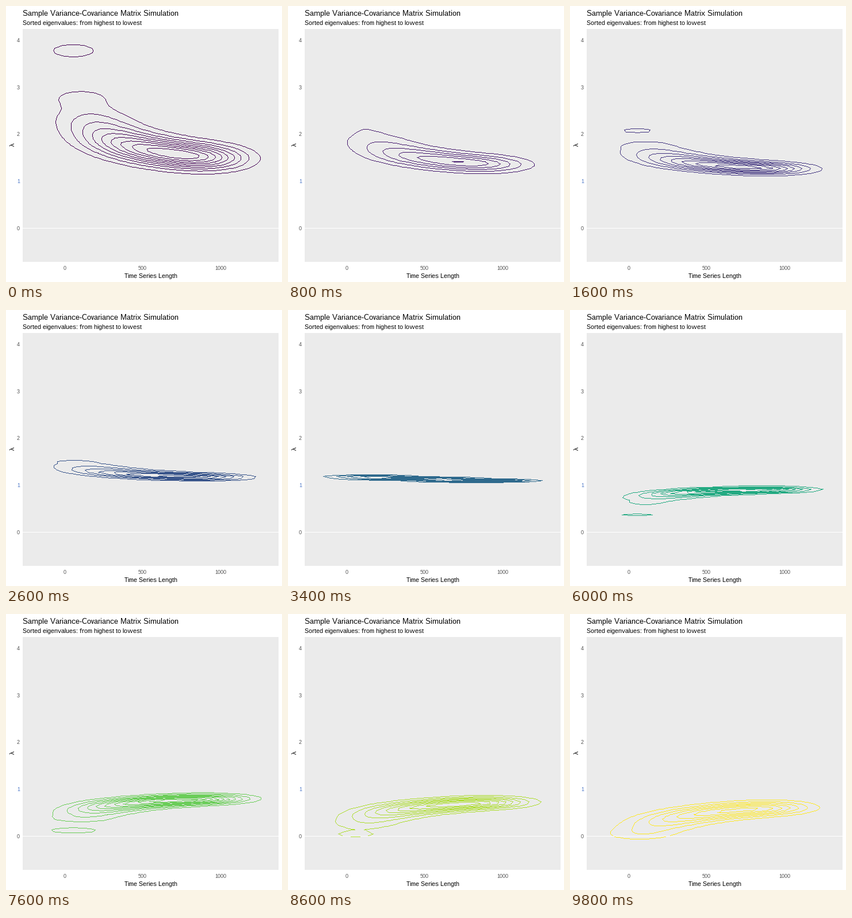
Recreate the animation shown at these times as a matplotlib script. Size 480x480 px, loop 10 s.

```python
import numpy as np
import matplotlib.pyplot as plt
from matplotlib.animation import FuncAnimation

SIZE, DPI = 480, 72
SERIES, FRAMES = 50, 50
LENGTHS = np.arange(50, 1001, 50)
X_LIM, Y_LIM = (-200, 1300), (-0.5, 4)
LEFT, RIGHT, TOP, BOTTOM = 29, 474, 40, 445
WIDTH, HEIGHT = RIGHT - LEFT, BOTTOM - TOP

plt.rcParams.update({"font.family": "Liberation Sans",
                     "text.hinting": "native", "text.hinting_factor": 1})


def mean_spectrum(rng, length, runs=100):
    """Average sorted eigenvalues of sample covariance matrices."""
    x = rng.standard_normal((runs, length, SERIES))
    x -= x.mean(axis=1, keepdims=True)
    cov = x.transpose(0, 2, 1) @ x / (length - 1)
    return np.linalg.eigvalsh(cov).mean(axis=0)[::-1]


def bandwidth(v):
    q1, q3 = np.percentile(v, [25, 75])
    return 1.06 * min(v.std(ddof=1), (q3 - q1) / 1.34) * len(v) ** -0.2


def kernel(grid, v):
    s = bandwidth(v)
    z = (grid[:, None] - v) / s
    return np.exp(-z * z / 2) / (s * np.sqrt(2 * np.pi))


def pretty_step(span, n=10):
    cell = span / n
    base = 10 ** np.floor(np.log10(cell))
    unit = base
    for mult, bias in ((2, 1.5), (5, 2.75), (10, 1.5)):
        if mult * base - cell < bias * (cell - unit):
            unit = mult * base
        else:
            break
    return unit


def pad(lim):
    extra = 0.05 * (lim[1] - lim[0])
    return lim[0] - extra, lim[1] + extra


def trace(mask, points):
    """Draw a one-pixel polyline without smoothing."""
    points = np.rint(points).astype(int)
    for a, b in zip(points[:-1], points[1:]):
        n = max(abs(b - a).max(), 1)
        t = np.arange(n + 1)[:, None] / n
        col, row = np.floor(a + (b - a) * t + 0.5).astype(int).T
        mask[row, col] = True


rng = np.random.default_rng(7)
spectra = np.array([mean_spectrum(rng, t) for t in LENGTHS])
x_view, y_view = pad(X_LIM), pad(Y_LIM)
grid_x = np.linspace(*X_LIM, 100)
grid_y = np.linspace(*Y_LIM, 100)
cols = (grid_x - x_view[0]) / np.ptp(x_view) * WIDTH
rows = (y_view[1] - grid_y) / np.ptp(y_view) * HEIGHT
kernel_x = kernel(grid_x, LENGTHS)

fig = plt.figure(figsize=(SIZE / DPI, SIZE / DPI), dpi=DPI, facecolor="white")
ax = fig.add_axes([LEFT / SIZE, 1 - BOTTOM / SIZE,
                   WIDTH / SIZE, HEIGHT / SIZE])
ax.set_facecolor("#ebebeb")
image = ax.imshow(np.zeros((HEIGHT, WIDTH, 4)), aspect="auto",
                  extent=(0, WIDTH, HEIGHT, 0), interpolation="nearest",
                  zorder=2)
ax.set(xticks=[], yticks=[], xlim=(0, WIDTH), ylim=(HEIGHT, 0))
ax.set_autoscale_on(False)
for spine in ax.spines.values():
    spine.set_visible(False)
ax.axhline(y_view[1] / np.ptp(y_view) * HEIGHT, color="white", lw=1, zorder=5)


def label(x, y, text, size, color="black", **kw):
    fig.text(x / SIZE, 1 - y / SIZE, text, fontsize=size, color=color, **kw)


label(29, 17, "Sample Variance-Covariance Matrix Simulation", 13)
label(29, 33, "Sorted eigenvalues: from highest to lowest", 11)
label(251.5, 473, "Time Series Length", 11, ha="center")
label(12, 241, "λ", 11, ha="center", va="center", rotation=90)
for i, x in enumerate((102.5, 237.5, 373)):
    label(x, 459, str(500 * i), 9, "#4d4d4d", ha="center")
for i in range(5):
    label(24, 390 - 81.8 * i, str(i), 9,
          "#4470c4" if i == 1 else "#4d4d4d", ha="right")


def draw(i):
    density = kernel(grid_y, spectra[:, i]) @ kernel_x.T / len(LENGTHS)
    step = pretty_step(np.ptp(density))
    rings = ax.contour(cols, rows, density,
                       levels=np.arange(step, density.max(), step))
    rings.remove()
    mask = np.zeros((HEIGHT, WIDTH), bool)
    for level in rings.allsegs:
        for ring in level:
            trace(mask, ring)
    pixels = np.zeros((HEIGHT, WIDTH, 4))
    pixels[mask] = plt.cm.viridis(i / (FRAMES - 1))
    image.set_data(pixels)
    return [image]


anim = FuncAnimation(fig, draw, frames=FRAMES, interval=200,
                     repeat=True, repeat_delay=0, blit=False)
plt.show()
```
